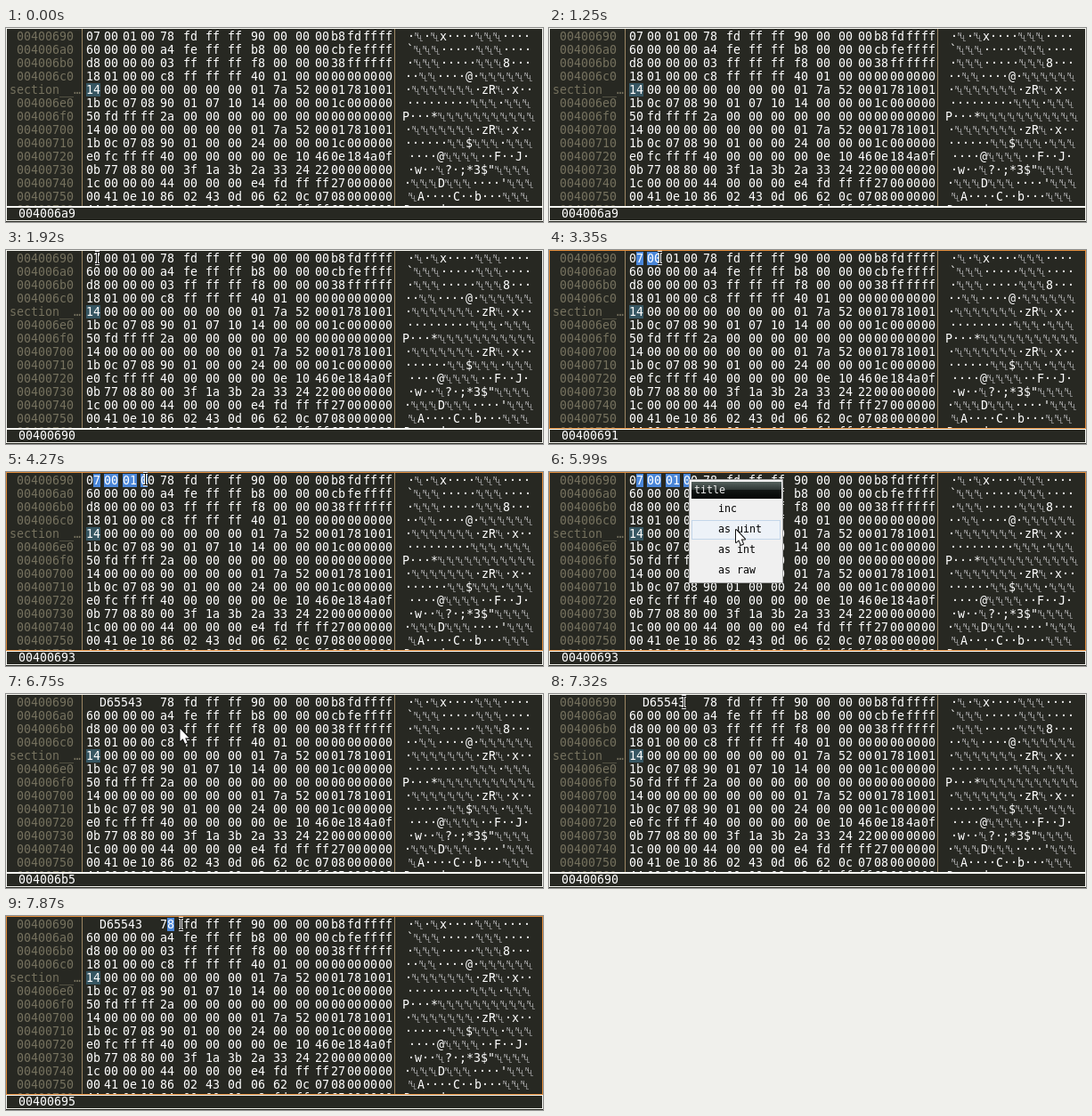
Write an HTML page with a canvas that moves like this. It is 603 by 218 pixels and loops after 8 s.

```html
<!DOCTYPE html>
<html lang="en">
<head>
<meta charset="utf-8">
<title>Hex viewer</title>
<style>
html, body { margin: 0; width: 100%; height: 100%; overflow: hidden; background: #272822; }
canvas { display: block; }
</style>
</head>
<body>
<canvas id="stage" width="603" height="218"></canvas>
<script>
const ctx = document.getElementById('stage').getContext('2d', { alpha: false });
const LOOP = 8000, ROW = 15, TOP = 2, CHAR = 8, BASE = 0x400690;
const MONO = '13.29px "DejaVu Sans Mono", monospace';
const MENU_FONT = '11.63px "DejaVu Sans Mono", monospace';
const BG = '#272822', INK = '#fff', DIM = '#75715e', BLUE = '#4a86d8', RING = '#e08c3c', RULE = '#9c8664';

// Memory: an unwind lookup table followed by unwind records, little-endian
const words = (...values) => values.flatMap(v => [0, 8, 16, 24].map(shift => v >> shift & 255));
const ops = str => str.split(' ').map(b => parseInt(b, 16));
const common = tail => [...words(0x14, 0), ...ops('01 7a 52 00 01 78 10 01 1b 0c 07 08 90 01 ' + tail)];
const memory = [
  ...words(0x10007, -648, 0x90, -584, 0x60, -348, 0xb8, -309, 0xd8, -253, 0xf8, -200, 0x118, -56, 0x140, 0),
  ...common('07 10'),
  ...words(0x14, 0x1c, -688, 0x2a, 0, 0),
  ...common('00 00'),
  ...words(0x24, 0x1c, -800, 0x40),
  ...ops('00 0e 10 46 0e 18 4a 0f 0b 77 08 80 00 3f 1a 3b 2a 33 24 22'),
  ...words(0, 0x1c, 0x44, -540, 0x27),
  ...ops('00 41 0e 10 86 02 43 0d 06 62 0c 07 08 00 00 00'),
  ...words(0x44, 0x64, -536, 0x65)
];

// Each pointer move eases on from where the previous one ended
const moves = [
  { from: 1210, to: 1920, x: 102, y: 9 },
  { from: 2120, to: 2280, x: 124, y: 9 },
  { from: 3350, to: 3600, x: 75, y: 9 },
  { from: 3600, to: 4090, x: 156, y: 8 },
  { from: 4270, to: 4470, x: 163, y: 8 },
  { from: 4650, to: 4790, x: 156, y: 8 },
  { from: 5260, to: 5990, x: 210, y: 65 },
  { from: 6220, to: 6750, x: 195.5, y: 39 },
  { from: 6750, to: 6990, x: 66, y: 10 },
  { from: 7030, to: 7470, x: 182, y: 9 },
  { from: 7630, to: 7870, x: 196, y: 9 }
];

const clamp01 = u => Math.min(1, Math.max(0, u));
const smooth = u => u * u * (3 - 2 * u);

function pointerAt(t) {
  return moves.reduce(([x, y], m) => {
    const k = smooth(clamp01((t - m.from) / (m.to - m.from)));
    return [x + (m.x - x) * k, y + (m.y - y) * k];
  }, [-8, 58]);
}

const isMenuOpen = t => t >= 5040 && t < 6220;
const isFocused = t => (t >= 2120 && t < 6220) || t >= 7630;
const isMerged = t => t >= 6220;

// Columns come in three widths
const cellX = col => 88 + Math.min(col, 4) * 20.2
  + Math.min(Math.max(col - 4, 0), 7) * 25.3 + Math.max(col - 11, 0) * 17.9;
const byteX = col => Math.round((cellX(col) + cellX(col + 1)) / 2 - CHAR);
const hex = (n, width) => n.toString(16).padStart(width, '0');

function text(str, x, y, color = INK) {
  ctx.fillStyle = color;
  ctx.fillText(str, x, y);
}

function fill(color, x, y, w, h) {
  ctx.fillStyle = color;
  ctx.fillRect(x, y, w, h);
}

function frame(color, x, y, w, h) {
  ctx.strokeStyle = color;
  ctx.lineWidth = 1;
  ctx.strokeRect(x + 0.5, y + 0.5, w - 1, h - 1);
}

function hoveredAddress(t) {
  if (isMenuOpen(t)) return BASE + 3;
  const [x, y] = pointerAt(t);
  if (x < 88 && t < 1920) return BASE + 25;
  const row = Math.max(0, Math.floor((y - TOP) / ROW));
  let col = 0;
  while (col < 15 && cellX(col + 1) <= x) col++;
  if (isMerged(t) && row === 0 && col < 4) col = 0;
  return BASE + row * 16 + col;
}

function selectionAt(t) {
  if (!isFocused(t)) return [0, 0];
  const [anchor, end] = t < 6220 ? [98, 4090] : [182, LOOP];
  return [anchor, pointerAt(Math.min(t, end))[0]].sort((a, b) => a - b);
}

function drawNul(x, y) {
  ctx.font = '5.5px "DejaVu Sans", sans-serif';
  [...'NUL'].forEach((c, i) => text(c, x + i * 3, y - 5 + i * 2.8, '#dcdce0'));
  ctx.font = MONO;
}

function drawAscii(row, y) {
  const width = code => code ? CHAR : 10;
  let x = Math.round(519.5 - row.reduce((sum, code) => sum + width(code), 0) / 2);
  for (const code of row) {
    if (!code) drawNul(x, y);
    else text(code > 32 && code < 127 ? String.fromCharCode(code) : '·', x, y);
    x += width(code);
  }
}

function drawRow(row, t) {
  const bytes = memory.slice(row * 16, row * 16 + 16);
  const top = TOP + row * ROW, y = top + 12;
  const merged = row === 0 && isMerged(t);
  const [from, to] = row === 0 ? selectionAt(t) : [0, 0];
  if (row === 4) {
    text('section__…', 4, y, DIM);
    fill('#365662', 90, top, 16, ROW);
  } else {
    text(hex(BASE + row * 16, 8), 12, y, DIM);
  }
  bytes.forEach((b, col) => {
    if (merged && col < 4) return;
    const x = byteX(col);
    for (const left of [x, x + CHAR]) {
      const mid = left + CHAR / 2;
      if (mid > from && mid < to) fill(BLUE, left, top, CHAR, ROW);
    }
    text(hex(b, 2), x, y);
  });
  if (merged) text('D65543', 105, y);
  drawAscii(bytes, y);
}

function drawMenu(t) {
  const [px, py] = pointerAt(t);
  fill('#f0f0f0', 157, 8, 106, 117);
  frame('#a8a8a8', 157, 8, 106, 117);
  const shade = ctx.createLinearGradient(0, 11, 0, 30);
  shade.addColorStop(0, '#56635f');
  shade.addColorStop(0.5, '#2c3432');
  shade.addColorStop(0.5, '#121615');
  shade.addColorStop(1, '#050606');
  fill(shade, 160, 11, 101, 19);
  ctx.font = MENU_FONT;
  text('title', 163, 24, '#f0f0f0');
  ['inc', 'as uint', 'as int', 'as raw'].forEach((label, i) => {
    const top = 30 + i * 23;
    if (px >= 160 && py >= top && py < top + 23) {
      fill('#edf2f8', 160, top + 1, 100, 22);
      frame('#c3d6ea', 160, top + 1, 100, 22);
    }
    text(label, 190, top + 15, '#000');
  });
}

function drawBeam(x, y) {
  x = Math.round(x) + 0.5;
  y = Math.round(y);
  ctx.beginPath();
  for (const end of [y - 6.5, y + 6.5]) {
    ctx.moveTo(x - 2.5, end);
    ctx.lineTo(x + 2.5, end);
  }
  ctx.moveTo(x, y - 6.5);
  ctx.lineTo(x, y + 6.5);
  for (const [color, width] of [['#fff', 3], ['#000', 1]]) {
    ctx.strokeStyle = color;
    ctx.lineWidth = width;
    ctx.stroke();
  }
}

function drawArrow(x, y) {
  ctx.save();
  ctx.translate(x, y);
  const shape = new Path2D('M0 0V14L3.2 11.2L5.6 16.8L8 15.8L5.7 10.4H10Z');
  ctx.strokeStyle = '#111';
  ctx.lineWidth = 2;
  ctx.lineJoin = 'round';
  ctx.stroke(shape);
  ctx.fillStyle = '#fff';
  ctx.fill(shape);
  ctx.restore();
}

function draw(t) {
  fill(BG, 0, 0, 603, 218);
  ctx.font = MONO;
  ctx.save();
  ctx.beginPath();
  ctx.rect(0, 0, 603, 200);
  ctx.clip();
  for (let row = 0; row * 16 < memory.length; row++) drawRow(row, t);
  ctx.restore();

  for (const x of [85, 436]) fill(RULE, x, 1, 1, 199);
  frame(isFocused(t) ? RING : '#f8f8f2', 0, 0, 603, 201);
  fill(BG, 0, 201, 603, 17);
  frame('#f8f8f2', 0, 201, 603, 16);
  text(hex(hoveredAddress(t), 8), 14, 213);

  if (isMenuOpen(t)) drawMenu(t);
  const drawPointer = t > 5300 && t < 6800 ? drawArrow : drawBeam;
  drawPointer(...pointerAt(t));
}

const start = performance.now();
function tick() {
  draw((performance.now() - start) % LOOP);
  requestAnimationFrame(tick);
}
tick();
</script>
</body>
</html>
```
